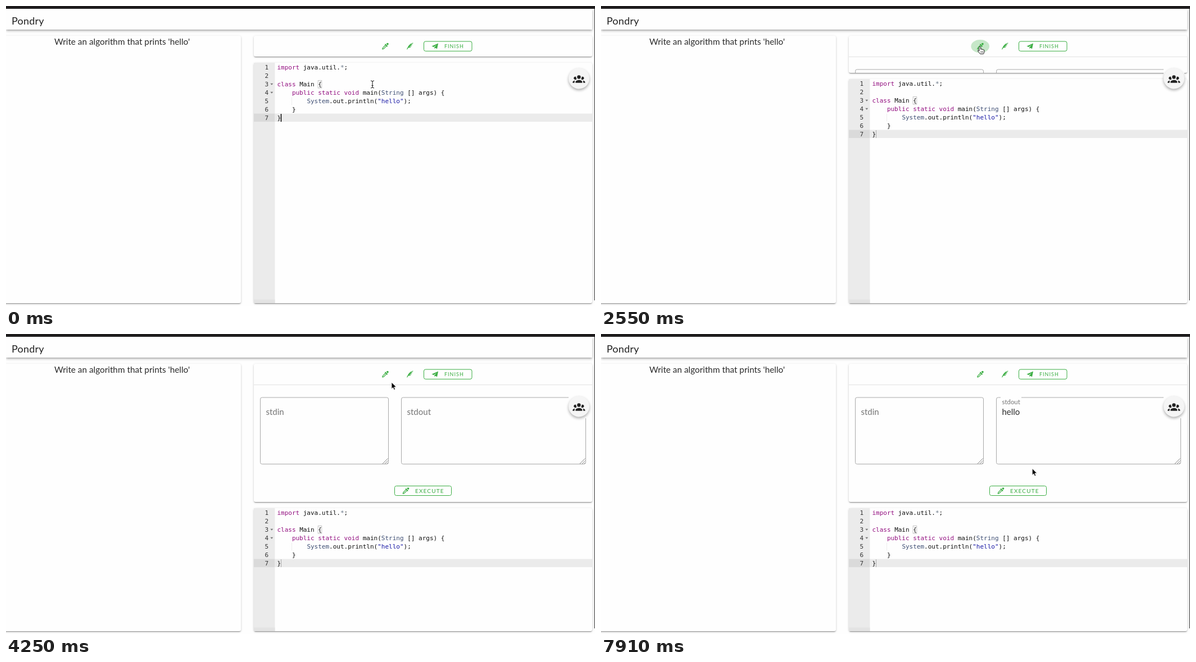
Recreate the animation shown at these times as an HTML page. Size 1048 by 534 pixels, loop 8000 ms.

```html
<!DOCTYPE html>
<html lang="en">
<head>
<meta charset="utf-8">
<title>Code editor</title>
<style>
  html, body { margin: 0; width: 100%; height: 100%; overflow: hidden; background: #fefefe; }
  .card {
    position: absolute; background: #fefefe; border-radius: 3px;
    box-shadow: 0 2px 1px -1px rgba(0,0,0,.24), 0 1.5px 2px rgba(0,0,0,.16), 0 1px 4px rgba(0,0,0,.13);
  }
  #bar { left: 0; top: 0; width: 1048px; height: 5px; position: absolute; background: #1e1c1d; }
  #head {
    left: 0; top: 5px; width: 1043px; height: 37px; border-radius: 0;
    box-shadow: 0 1.5px 3px -1px rgba(0,0,0,.3), 0 3px 4px rgba(0,0,0,.14), 0 1px 6px rgba(0,0,0,.1);
  }
  #task { left: -4px; top: 53px; width: 422px; height: 476px; }
  #tools { left: 441px; top: 53px; width: 602px; }
  #editor { left: 441px; width: 602px; }
  svg { position: absolute; left: 0; top: 0; }
  text { font-family: Lato, sans-serif; }
  .code text { font: 11px "DejaVu Sans Mono", monospace; }
  .field { fill: none; stroke: #a9a9a9; }
</style>
</head>
<body>
<div id="head" class="card"></div>
<div id="bar"></div>
<div id="task" class="card"></div>
<div id="editor" class="card"></div>
<div id="tools" class="card"></div>

<svg width="1048" height="534" viewBox="0 0 1048 534">
  <defs>
    <clipPath id="ioClip"><rect id="ioRect" x="441" y="90" width="602"/></clipPath>
    <filter id="soft" x="-50%" y="-50%" width="200%" height="200%"><feGaussianBlur stdDeviation="2.6"/></filter>
    <path id="dropper" d="M19.35 11.72L17.22 13.85 15.81 12.43 8.1 20.14 3.5 22 2 20.5 3.86 15.9 11.57 8.19 10.15 6.78 12.28 4.65ZM16.76 3C17.93 1.83 19.83 1.83 21 3 22.17 4.17 22.17 6.07 21 7.24L19.08 9.16 14.84 4.92ZM5.56 17.03L4.5 19.5 6.97 18.44 14.4 11 13 9.6Z"/>
    <path id="feather" d="M22 2C22 2 14.4 1.6 8.3 9.9 3.7 16.2 2 22 2 22L3.9 21C5.4 18.5 6.1 17.5 7.5 16 10 16.7 12.7 16.6 15 14 13 13.4 11.4 13.6 9 13.8 11.7 12 13.5 11.6 16 12L17 10C15.2 9.7 14 9.6 12.2 10 14.2 8.6 15.6 7.9 18 8L19.2 6C17.6 6 16.7 6.1 14.9 6.6 16.5 5.1 18 4.4 20.1 4.3 20.1 4.3 21.2 2.4 22 2Z"/>
  </defs>

  <rect x="1046.6" y="5" width="1.4" height="519" fill="#666"/>
  <text x="10" y="33" font-size="18" letter-spacing=".2" fill="#222">Pondry</text>
  <text x="86" y="69" font-size="15.3" fill="#2b2b2b">Write an algorithm that prints 'hello'</text>

  <g class="code">
    <rect id="gutter" x="441" width="37.5" fill="#ebebeb"/>
    <rect x="441" y="522.5" width="37.5" height="6.5" fill="#e3e3e3"/>
    <g id="doc">
      <rect x="441" y="191.5" width="37.5" height="14.5" fill="#dadada"/>
      <rect x="478.5" y="191.5" width="564.5" height="14.5" fill="#ebebeb"/>
      <path d="M470.3 137.8h5l-2.5 3zM470.3 152.8h5l-2.5 3z" fill="#777"/>
      <path d="M508.5 163v13" stroke="#ddd" stroke-dasharray="1 1"/>
      <rect x="555.3" y="132.5" width="6.4" height="13.5" fill="none" stroke="#c4c4c4"/>
      <path id="caret" d="M489.5 192v14"/>
    </g>
  </g>

  <g clip-path="url(#ioClip)">
    <path d="M441 90.5H1043" stroke="#e2e2e2"/>
    <rect class="field" x="452.5" y="113" width="228" height="118.5" rx="3"/>
    <rect id="out" class="field" x="703.5" y="113" width="328" height="118.5" rx="3"/>
    <rect id="notch" x="711" y="111" width="37" height="4" fill="#fefefe"/>
    <path d="M670 231l9.5-9.5M674 231l5.5-5.5M677.500 231l2-2M1021 231l9.500-9.500M1025 231l5.500-5.500M1028.500 231l2-2" stroke="#777" stroke-width=".9"/>
    <text x="462.500" y="144" font-size="15" fill="#757575">stdin</text>
    <text id="outLabel" x="713.500" fill="#757575">stdout</text>
    <text id="outText" x="713.500" y="144" font-size="15" fill="#2b2b2b">hello</text>
    <g id="execute">
      <rect id="press" x="691.500" y="270.500" width="101" height="17" rx="3" stroke="none"/>
      <rect x="691.500" y="270.500" width="101" height="17" rx="3" fill="none" stroke="currentColor"/>
      <use href="#dropper" transform="translate(704.400 271.900) scale(.59)" fill="currentColor"/>
      <text x="728" y="282.500" font-size="10" letter-spacing="1.150" fill="currentColor">EXECUTE</text>
    </g>
  </g>

  <ellipse id="ripple" cx="674.700" cy="71.700" rx="16.300" ry="11.600" fill="#43b04a"/>
  <use href="#dropper" transform="translate(667.800 64.500) scale(.59)" fill="#3aad42"/>
  <g id="finish">
    <use href="#feather" transform="translate(711.900 64.500) scale(.59)" fill="currentColor"/>
    <rect x="743.500" y="63" width="85.500" height="17.300" rx="3" fill="none" stroke="currentColor"/>
    <path d="M769 66.500L757.500 71.600 761 73 766.500 69 762.300 73.500V76L764 74.400 767 76.300Z" fill="currentColor"/>
    <text x="780" y="74.800" font-size="9" letter-spacing="1" fill="currentColor">FINISH</text>
  </g>

  <rect x="1001" y="101" width="37" height="49" fill="#fefefe"/>
  <circle cx="1019.500" cy="131.500" r="18.500" fill="#000" opacity=".32" filter="url(#soft)"/>
  <circle cx="1019.500" cy="129" r="18.500" fill="#f5f5f5"/>
  <g fill="#222" transform="translate(1008.300 118.300) scale(.92)">
    <circle cx="12" cy="9" r="3.500"/>
    <path d="M5 8C5.600 8 6.100 8.150 6.500 8.400 6.400 9.850 6.800 11.300 7.700 12.400A3 3 0 1 1 5 8M19 8A3 3 0 1 1 16.300 12.400C17.200 11.300 17.600 9.850 17.500 8.400 17.900 8.150 18.400 8 19 8M5.500 18.250C5.500 16.300 8.400 14.750 12 14.750S18.500 16.300 18.500 18.250V20H5.500ZM0 20V18.500C0 17.100 1.900 15.900 4.450 15.600 3.900 16.300 3.500 17.200 3.500 18.250V20ZM24 20H20.500V18.250C20.500 17.200 20.100 16.300 19.550 15.600 22.100 15.900 24 17.100 24 18.500Z"/>
  </g>

  <g id="tip">
    <rect x="674.500" y="87.500" width="49" height="16" fill="#f0f0f0" stroke="#d0d0d0"/>
    <text x="680" y="98.800" font-size="10" fill="#333">Execute</text>
  </g>

  <g id="beam" fill="none">
    <path d="M-3-6.500Q0-6.500 0-4.500Q0-6.500 3-6.500M0-4.500V4.500M-3 6.500Q0 6.500 0 4.500Q0 6.500 3 6.500M-1.500 2H1.500" stroke="#fff" stroke-width="2.200"/>
    <path d="M-3-6.500Q0-6.500 0-4.500Q0-6.500 3-6.500M0-4.500V4.500M-3 6.500Q0 6.500 0 4.500Q0 6.500 3 6.500M-1.500 2H1.500" stroke="#111"/>
  </g>
  <path id="arrow" d="M0 0V11.700L2.700 9.200 4.500 13.400 6.500 12.500 4.700 8.400H8.400Z" fill="#000" stroke="#fff" stroke-width=".8"/>
  <g id="hand" stroke="#111" stroke-width="1" stroke-linejoin="round">
    <path d="M-1.400 1Q0-.8 1.400 1V5Q2.800 4 3.700 5.300 5 4.600 5.900 6 7.500 5.600 7.700 7.200V9.500Q7.400 11.500 6.300 13.200H.3Q-1.800 10.600-3.700 8.300-4 6.500-2.600 6.900L-1.400 8.200Z" fill="#fff"/>
    <path d="M1.600 8.500v2.500M3.500 8.500v2.500M5.300 8.500v2.500" stroke-width=".7"/>
  </g>
</svg>

<script>
const LOOP = 8000;
const PANEL = 209;
const GREEN = '#3aad42', GREY = '#bcbcbc';
const CHAR = 6.6225;
const el = id => document.getElementById(id);
const show = (id, on) => { el(id).style.display = on ? '' : 'none'; };
const set = (id, attrs) => {
  for (const key in attrs) el(id).setAttribute(key, attrs[key]);
};

const KEY = '#930f80', TYPE = '#3c4c72', STR = '#1a1aa6', OP = '#687687', INK = '#111';
const lines = [
  [[0, 'import', KEY], [7, 'java.util.', INK], [17, '*', OP], [18, ';', INK]],
  [],
  [[0, 'class', KEY], [6, 'Main', INK], [11, '{', INK]],
  [[4, 'public', KEY], [11, 'static', KEY], [18, 'void', KEY], [23, 'main(', INK],
   [28, 'String', TYPE], [35, '[] args) {', INK]],
  [[8, 'System', TYPE], [14, '.out.println(', INK], [27, '"hello"', STR], [34, ');', INK]],
  [[4, '}', INK]],
  [[0, '}', INK]]
];

function addText(x, y, str, fill, anchor = 'start') {
  const node = document.createElementNS('http://www.w3.org/2000/svg', 'text');
  node.setAttribute('x', x);
  node.setAttribute('y', y);
  node.setAttribute('fill', fill);
  node.setAttribute('text-anchor', anchor);
  node.textContent = str;
  el('doc').append(node);
}

lines.forEach((parts, row) => {
  const y = 113 + row * 14.97;
  addText(467, y, row + 1, '#333', 'end');
  for (const [col, str, fill] of parts) addText(482.4 + col * CHAR, y, str, fill);
});

// Pointer track: time, shape, x, y
const pointer = [
  [0, 'beam', 652, 139.5], [300, 'beam', 653, 136.5], [450, 'beam', 654, 135],
  [1050, 'beam', 655, 134], [1350, 'beam', 655, 133.5], [1500, 'beam', 659, 122],
  [1650, 'arrow', 668, 99], [1800, 'arrow', 673, 86], [1950, 'hand', 676, 74],
  [2100, 'hand', 675, 72], [2400, 'hand', 674.3, 72], [2910, 'hand', 675, 71],
  [3800, 'hand', 675.6, 71.5], [4250, 'arrow', 686, 86], [4400, 'beam', 710, 133],
  [4550, 'beam', 731, 183], [4700, 'arrow', 744, 246], [4850, 'hand', 743, 289],
  [5020, 'hand', 741, 284], [5470, 'arrow', 751, 272], [5620, 'arrow', 771, 242],
  [7110, 'arrow', 770.3, 241.5], [7710, 'arrow', 769, 240.5], [7910, 'arrow', 767.3, 239.5]
];

// Held values: time, value
const panel = [[0, 0], [2550, 29], [2730, 196], [2910, PANEL]];
const caret = [[0, 'on'], [450, 'off'], [900, 'on'], [1500, 'off'], [1950, 'on'], [2400, 'blur']];
const ripple = [[0, 0], [1950, .05], [2400, .12], [2550, .3], [2730, .2], [2910, .06], [4250, 0]];
const label = [[0, 0], [7560, .5], [7710, 1]];

const at = (track, t) => track.findLast(step => step[0] <= t);
const within = (t, from, to) => t >= from && t < to;

function draw(t) {
  const off = at(panel, t)[1];
  el('tools').style.height = 37 + off + 'px';
  el('editor').style.top = 101 + off + 'px';
  el('editor').style.height = 428 - off + 'px';
  set('gutter', { y: 101 + off, height: 428 - off });
  set('doc', { transform: `translate(0 ${off})` });
  set('ioRect', { height: off });

  const mode = at(caret, t)[1];
  show('caret', mode !== 'off');
  set('caret', mode === 'on'
    ? { stroke: '#000', 'stroke-width': 1.5 }
    : { stroke: '#999', 'stroke-width': .8 });
  set('ripple', { opacity: at(ripple, t)[1] });
  show('tip', within(t, 3350, 4250));

  const color = within(t, 5470, 7560) ? GREY : GREEN;
  el('finish').style.color = el('execute').style.color = color;
  set('press', { fill: within(t, 5320, 5470) ? '#d3ecd5' : 'none' });

  const lift = at(label, t)[1];
  set('outLabel', { y: 144 - 19 * lift, 'font-size': 15 - 3.6 * lift });
  show('notch', lift > 0);
  show('outText', lift > 0);
  el('out').style.stroke = within(t, 4400, 4700) ? '#333' : '';

  const [, shape, x, y] = at(pointer, t);
  for (const name of ['beam', 'arrow', 'hand']) show(name, name === shape);
  set(shape, { transform: `translate(${x} ${y})` });
}

const start = performance.now();
function tick() {
  draw((performance.now() - start) % LOOP);
  requestAnimationFrame(tick);
}
tick();
</script>
</body>
</html>
```
